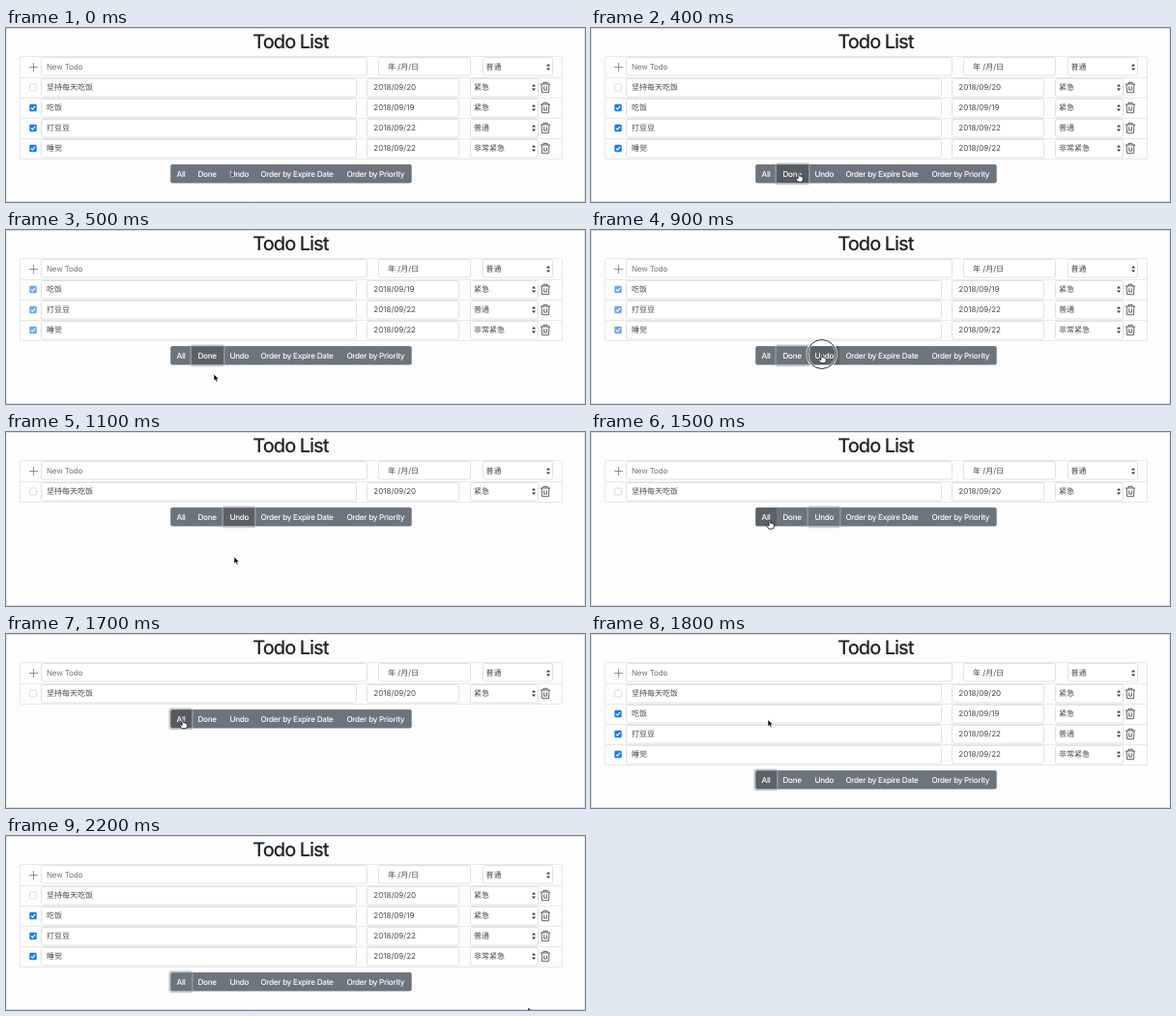
An HTML page that plays this animation: 599 px wide and 180 px high, repeating every 2.3 s.

```html
<!DOCTYPE html>
<html lang="zh-CN">
<head>
<meta charset="utf-8">
<title>Todo List</title>
<style>
  html, body { margin: 0; width: 100%; height: 100%; overflow: hidden; background: #fdfdfd; }
  svg { display: block; }
  text {
    font: 8px Inter, "Noto Sans CJK SC", "Noto Sans CJK", sans-serif;
    fill: #42484e;
    text-rendering: geometricPrecision;
  }
  .title { font-size: 20px; font-weight: 500; letter-spacing: -.05em; fill: #212529; }
  .tight { letter-spacing: -.02em; fill: #6c757d; }
  .item { fill: none; stroke: #e8e8e8; }
  .field { fill: #fff; stroke: #dfe2e5; }
  .line { fill: none; stroke: #3c3f42; stroke-width: .8; }
  .plus { fill: none; stroke: #555; stroke-width: .6; }
  .box { fill: #fff; stroke: #d4d4d4; stroke-width: .8; }
  .check { fill: #1a7df0; }
  .pale .check { fill: #6ea6f3; }
  .tick { fill: none; stroke: #fff; stroke-width: 1.1; }
  .btn { fill: #6c757d; }
  .btn.shade { fill: #5a6268; }
  .btn.down { fill: #545b62; }
  .label { font-size: 8.1px; font-weight: 500; letter-spacing: -.03em; fill: #fff; }
  .focus { fill: none; stroke: #a5aaaf; stroke-opacity: .6; stroke-width: 1.7; }
</style>
</head>
<body>
<svg id="stage" width="599" height="180" viewBox="0 0 599 180">
  <defs>
    <clipPath id="round"><rect x="170.2" width="249.5" height="19.4" rx="2"/></clipPath>
    <g id="arrows" fill="#343a40"><path d="M-2-1L0-3.6L2-1ZM-2 1L0 3.6L2 1Z"/></g>
    <g id="trash" class="line">
      <path d="M-5-3.5H5M-2-3.5V-5.2H2V-3.5M-3.9-3.5L-3.4 5.2H3.4L3.9-3.5M-1.4-1.2V2.6H1.4V-1.2"/>
    </g>
  </defs>
  <path d="M.5 180V.5H598.5V180" fill="none" stroke="#e6e6e6"/>
  <path d="M0 .5H599M0 179.5H599" stroke="#dcdcdc"/>
  <text class="title" x="255.3" y="21">Todo List</text>

  <rect class="item" x="14.5" y="29.5" width="561" height="22" rx="1.5"/>
  <path class="plus" d="M24 40.5H33M28.5 36V45"/>
  <rect class="field" x="36.5" y="30.5" width="337" height="18.5" rx="2"/>
  <rect class="field" x="385.5" y="30.5" width="95" height="18.5" rx="2"/>
  <rect class="field" x="493.5" y="30.5" width="72" height="18.5" rx="2"/>
  <text class="tight" x="42" y="43.2">New Todo</text>
  <text x="395" y="43.2">年 /月/日</text>
  <text x="496.5" y="43.2">普通</text>
  <use href="#arrows" x="561" y="40.5"/>

  <g id="list"></g>
  <g id="bar">
    <g id="buttons" clip-path="url(#round)"></g>
    <rect id="focus" class="focus" y="-.8" height="21" rx="1.5"/>
    <g id="labels"></g>
  </g>

  <g id="ring" fill="none">
    <circle r="15" stroke="#fff" stroke-width="2.6" stroke-opacity=".8"/>
    <circle r="15" stroke="#333" stroke-width="1"/>
  </g>
  <g id="cursor">
    <path id="arrow" d="M0 0V7.2L1.7 5.7L2.9 8.3L4.1 7.7L3 5.2H5.2Z"
          fill="#000" stroke="#fff" stroke-width=".6"/>
    <path id="hand" d="M-.9 .6Q0-.6 .8 .6V3.4Q1.6 2.8 2.2 3.7Q3 3.2 3.4 4.1Q4.4 3.8 4.4 5V7L3.4 9.2H-1.2L-3.2 6Q-3.6 4.6-2.3 5L-.9 6.2Z"
          fill="#fff" stroke="#111" stroke-width=".8"/>
  </g>
</svg>
<script>
const $ = id => document.getElementById(id);
const LOOP = 2300, STEP = 100, ROW = 21;

const todos = [
  ['坚持每天吃饭', '2018/09/20', '紧急', false],
  ['吃饭', '2018/09/19', '紧急', true],
  ['打豆豆', '2018/09/22', '普通', true],
  ['睡觉', '2018/09/22', '非常紧急', true]
];
const buttons = [
  ['All', 170, 192], ['Done', 192, 225], ['Undo', 225, 257],
  ['Order by Expire Date', 257, 346], ['Order by Priority', 346, 420]
];

// step, x, y of the pointer tip
const path = [
  [0, 232, 148], [2, 218, 150], [3, 215, 150], [4, 215, 150], [5, 215, 149],
  [6, 217, 147], [7, 226, 140], [8, 236, 130], [9, 238.8, 128.5], [10, 238.8, 128.5],
  [11, 236, 129], [12, 225, 134], [13, 212, 122], [15, 185, 91], [16, 183, 88.5],
  [17, 183, 88.5], [18, 183, 88.5], [19, 230, 100], [22, 540, 177]
];
const clicks = [[4, 1], [10, 2], [17, 0]];
const hover = '.UDDDD..UUUU...AAAA....';
const hands = [[1, 4], [8, 10], [15, 17]];

const field = (x, w) =>
  `<rect class="field" x="${x}" y="1.5" width="${w}" height="18.5" rx="2"/>`;
const text = (x, s) => `<text x="${x}" y="13.2">${s}</text>`;
const checkbox = done => done
  ? '<rect class="check" x="24.3" y="6.8" width="7.4" height="7.4" rx="1.3"/><path class="tick" d="M26 10.6L27.5 12.2L30 8.8"/>'
  : '<rect class="box" x="24.5" y="7" width="7" height="7" rx="1.3"/>';

$('list').innerHTML = todos.map(([name, date, level, done]) => `<g>
  <path class="item" d="M14.5 0V21.5H575.5V0"/>${checkbox(done)}
  ${field(36.5, 326)}${field(373.5, 95)}${field(480.5, 70)}
  ${text(42, name)}${text(380.3, date)}${text(484, level)}
  <use href="#arrows" x="546" y="10.5"/><use href="#trash" x="558" y="10.5"/></g>`).join('');
$('buttons').innerHTML = buttons.map(([, a, b]) =>
  `<rect class="btn" x="${a}" width="${b - a}" height="20"/>`).join('');
$('labels').innerHTML = buttons.map(([name, a]) =>
  `<text class="label" x="${a + 6.4}" y="12.7">${name}</text>`).join('');

const rows = [...$('list').children], rects = [...$('buttons').children];
const show = (el, on) => el.style.display = on ? '' : 'none';

function pointAt(n) {
  const i = Math.max(1, path.findIndex(p => p[0] >= n));
  const [s, x, y] = path[i - 1], [e, u, v] = path[i];
  const k = (n - s) / (e - s);
  return [x + (u - x) * k, y + (v - y) * k];
}

function drawList(n) {
  const view = n >= 5 && n < 11 ? 'done' : n >= 11 && n < 18 ? 'undo' : 'all';
  let count = 0;
  rows.forEach((row, i) => {
    const on = view === 'all' || todos[i][3] === (view === 'done');
    show(row, on);
    if (on) row.setAttribute('transform', `translate(0 ${51 + ROW * count++})`);
  });
  $('list').setAttribute('class', view === 'done' ? 'pale' : '');
  $('bar').setAttribute('transform', `translate(0 ${57.1 + ROW * count})`);
}

function drawBar(n) {
  const last = clicks.filter(c => c[0] <= n).pop();
  show($('focus'), last);
  if (last) {
    const [, a, b] = buttons[last[1]];
    $('focus').setAttribute('x', a - .8);
    $('focus').setAttribute('width', b - a + 1.6);
  }
  rects.forEach((rect, i) => {
    const down = clicks.some(c => c[0] === n && c[1] === i);
    const shade = i < 3 && hover[n] === 'ADU'[i];
    rect.setAttribute('class', 'btn' + (down ? ' down' : shade ? ' shade' : ''));
  });
}

function drawCursor(n) {
  const [x, y] = pointAt(n);
  const hand = hands.some(([a, b]) => n >= a && n <= b);
  const place = `translate(${x} ${y})`;
  $('cursor').setAttribute('transform', place);
  $('cursor').setAttribute('opacity', n ? 1 : .4);
  show($('hand'), hand);
  show($('arrow'), !hand);
  $('ring').setAttribute('transform', place);
  show($('ring'), clicks.some(c => c[0] === n + 1));
}

let shown = -1;
const start = performance.now();
function tick() {
  const n = Math.floor((performance.now() - start) % LOOP / STEP);
  if (n !== shown) {
    shown = n;
    drawList(n);
    drawBar(n);
    drawCursor(n);
  }
  requestAnimationFrame(tick);
}
tick();
</script>
</body>
</html>
```
